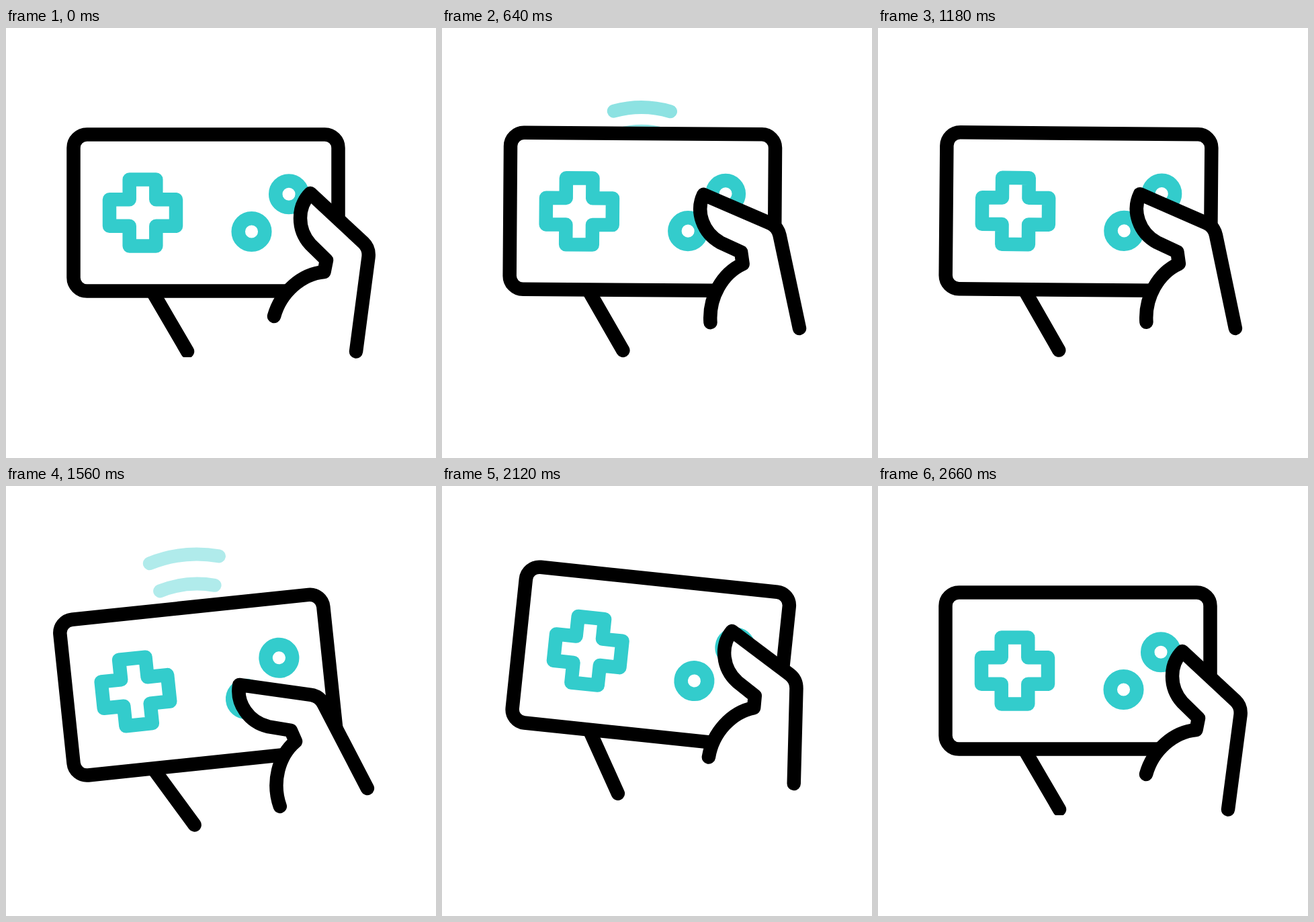
Write an HTML page that moves like this. It is 640 by 640 pixels and loops after 2.68 s.

```html
<!DOCTYPE html>
<html lang="en">
<head>
<meta charset="utf-8">
<title>Handheld game</title>
<style>
  html, body { margin: 0; width: 100%; height: 100%; overflow: hidden; background: #fff; }
  svg { display: block; width: 100vw; height: 100vh; }
  .ink, .teal { stroke-width: 20.5; stroke-linecap: round; stroke-linejoin: round; fill: #fff; }
  .ink { stroke: #000; }
  .teal { stroke: #33cccc; }
  #waves path { fill: none; stroke-width: 20; }
</style>
</head>
<body>
<svg viewBox="0 0 640 640">
  <clipPath id="floor"><rect width="640" height="490"/></clipPath>
  <g id="device">
    <g id="waves"><path class="teal"/><path class="teal"/></g>
    <path id="arm" class="ink" d="M217.5 391.5 270 481.5"/>
    <rect class="ink" x="100.5" y="158.5" width="394" height="233" rx="20"/>
    <path class="teal" d="M183.7 225.5h39.6v29.7h29.7v39.6h-29.7v29.7h-39.6v-29.7h-29.7v-39.6h29.7z"/>
    <circle class="teal" cx="421" cy="247.3" r="19.8"/>
    <circle class="teal" cx="365.5" cy="303" r="19.8"/>
  </g>
  <path id="hand" class="ink" d="M521 481.5 539.5 341C540.5 332 537.5 324.7 532 319.5L453 246
    C443 256 438 269 438 283C438 299 444 312 453 322L477 345.5 473.5 363C440 366 409 393 399 429"/>
</svg>
<script>
const LOOP = 2680;
const SWINGS = 3, SWING_START = 432, SWING_GAP = 560, SWING_TIME = 400;
const WAVE_START = 353, WAVE_GAP = 805, WAVE_TIME = 650;

const byId = id => document.getElementById(id);
const device = byId('device'), hand = byId('hand'), arm = byId('arm'), waves = byId('waves');

const mix = (a, b, k) => a + (b - a) * k;

// Smooth step from 0 to 1 between two times
function ease(t, from, to) {
  const u = Math.min(1, Math.max(0, (t - from) / (to - from)));
  return u * u * (3 - 2 * u);
}

// 0 when leaning left, 1 when leaning right
function sideAt(t) {
  let side = 0;
  for (let i = 0; i < SWINGS; i++) {
    const start = SWING_START + i * SWING_GAP;
    side += (i % 2 ? -1 : 1) * ease(t, start, start + SWING_TIME);
  }
  return side;
}

// An arc that grows away from the middle of the device
function arc(size) {
  const half = 42.3 * size, y = 290 - 165.2 * size;
  return `M${296 - half} ${y}q${half} ${-12 * size} ${2 * half} 0`;
}

function drawWaves(t) {
  const age = t - WAVE_START;
  const u = age < 0 ? 1 : Math.min(1, age % WAVE_GAP / WAVE_TIME);
  const shown = age < 2 * WAVE_GAP;
  const size = mix(0.632, 1.51, ease(u, 0, 1));
  waves.setAttribute('opacity', shown ? 1 - u : 0);
  waves.children[0].setAttribute('d', arc(size));
  waves.children[1].setAttribute('d', arc(size * 0.79));
}

function draw(t) {
  const stay = 1 - ease(t, 2106, 2655);
  const lean = ease(t, 0, 284) * stay;
  const side = sideAt(t);
  const tilt = lean * mix(-6, 6, side);
  const turn = lean * mix(-35, -6, side);
  const lift = side * stay;
  device.setAttribute('transform', `rotate(${tilt} 494.5 391.5)`);
  hand.setAttribute('transform', `translate(${-1.5 * lift} ${-34 * lift}) rotate(${turn} 479.5 439)`);
  // At rest the arm ends flat
  arm.setAttribute('clip-path', lean < 0.005 ? 'url(#floor)' : 'none');
  drawWaves(t);
}

const begin = performance.now();
function tick() {
  draw((performance.now() - begin) % LOOP);
  requestAnimationFrame(tick);
}
tick();
</script>
</body>
</html>
```
